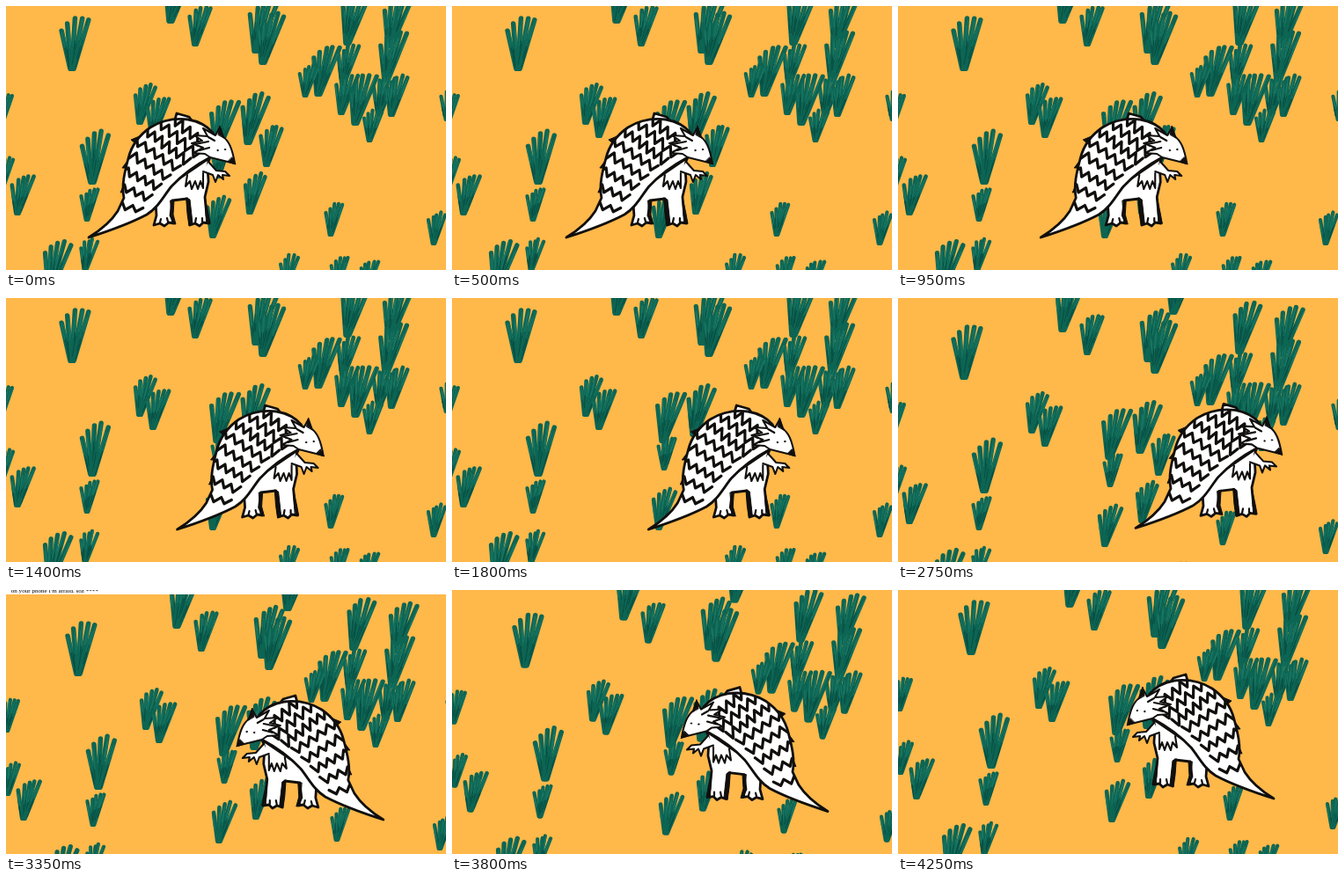
An HTML page for the animation above (4300 ms loop, 500 px wide and 300 px high).

```html
<!DOCTYPE html>
<html lang="en">
<head>
<meta charset="utf-8">
<title>Pangolin walk</title>
<style>
html, body { margin: 0; width: 100%; height: 100%; overflow: hidden; background: #ffb84a; }
svg { display: block; width: 100vw; height: 100vh; }
text { font: 7.1px "Liberation Serif", "Noto Serif", serif; text-anchor: end; }
#beast { stroke: #110f0d; stroke-linejoin: round; stroke-linecap: round; }
#beast .skin { fill: #fff; stroke-width: 2.8; }
#beast .thin { stroke-width: 2.1; }
#beast .line { fill: none; stroke-width: 2.2; }
#beast .ink { fill: #110f0d; stroke-width: 1; }
#scales { fill: none; stroke-width: 3.2; }
</style>
</head>
<body>
<svg viewBox="0 0 500 300" preserveAspectRatio="none">
  <defs>
    <clipPath id="inside"><path id="shell" d="M94 263 C107 255 120 244 127 233 L134 218 C131 204 135 188 139 173 C143 157 151 147 164 138 C177 130 190 127 207 129 C219 131 229 137 235 144 C239 154 239 165 232 172 C215 181 200 192 188 205 C179 216 173 229 160 237 C145 245 119 255 94 263Z"/></clipPath>
  </defs>
  <g id="world">
    <rect x="-20" y="-19" width="540" height="400" fill="#ffb84a"/>
    <g id="grass" stroke-linecap="round"></g>
    <rect x="-20" y="-80" width="540" height="61" fill="#fff"/>
    <text x="98" y="-21">on your phone I'm afraid. soz ****</text>
  </g>
  <g id="beast">
    <!-- belly and legs -->
    <path class="skin" d="M232 172 C227 180 230 190 230 200 L226 217 L228 238 L231 247 L224 246 L220 250 L215 247 L209 249 L208 237 L206 219 L189 221 L187 238 L191 247 L185 246 L180 250 L175 247 L168 249 L171 238 L170 224 L188 202Z"/>
    <path class="ink" d="M205 218 L209 220 L212 247 L208 250 L206 236Z M187 221 L191 221 L190 237 L193 248 L189 247Z M226 217 L230 236 L232 247 L228 247Z"/>
    <path class="line" d="M175 246 L176 242 M184 245 L183 241 M215 246 L216 241 M223 245 L223 241"/>
    <!-- arms -->
    <path class="skin thin" d="M230 177 L239 187 L249 188 L254 193 L246 192 L247 197 L241 192 L238 200 L235 192 L224 188"/>
    <path class="skin thin" d="M206 192 L204 205 L209 199 L211 208 L215 199 L218 208 L221 199 L224 207 L224 190"/>
    <!-- shell -->
    <path class="ink" d="M141 172 L132 184 L138 184Z M137 196 L130 212 L136 211Z M154 147 L142 152 L148 157Z"/>
    <path class="skin" d="M192 129 L194 122 L208 126 L211 130Z"/>
    <use href="#shell" class="skin"/>
    <g clip-path="url(#inside)"><path id="scales"/></g>
    <!-- head -->
    <path class="skin thin" d="M211 156 L223 153 L214 147 L229 148 L224 139 L238 147 L243 138 L246 148 C253 153 257 161 260 179 L248 176 L232 172 L226 168 L213 167 L224 161Z"/>
    <path class="ink" d="M257 172 L261 180 L252 177Z M241 146 L243 136 L248 150Z"/>
    <path class="line" d="M215 157 L230 154 M220 164 L231 161 M230 149 L237 153"/>
    <circle class="ink" cx="240.5" cy="164" r=".7"/>
    <circle class="ink" cx="249" cy="163" r=".7"/>
  </g>
</svg>
<script>
const $ = id => document.getElementById(id);
const LOOP = 4300, STEP = 50, TURN = 3150;

let seed = 11;
const rand = () => (seed = (seed * 16807) % 2147483647) / 2147483647;
const jit = n => (rand() - .5) * n;

// where tufts are rooted, by size
const meadow = [
  { h: 63, lean: .05, roots: "75,74 98,203" },
  { h: 60, lean: .15, roots: "187,20 313,0 284,54 388,45 436,48 292,67 432,87 355,103 397,136 275,158 240,165 50,325" },
  { h: 48, lean: .13, roots: "215,46 383,90 381,124 424,125 438,126 152,135 167,150 296,183 277,237 13,238 235,264" },
  { h: 39, lean: .1, roots: "340,104 501,131 -6,138 413,155 241,196 -5,210 92,245 369,262 486,272 90,302 318,320 376,322 409,326" }
];

function stroke(x1, y1, x2, y2, w, color) {
  return `<path d="M${x1} ${y1}L${x2} ${y2}" stroke="${color}" stroke-width="${w}"/>`;
}

function drawTuft(x, y, h, lean) {
  const w = 2 + h * .055, blades = 5;
  let out = "";
  for (let i = 0; i < blades; i++) {
    const p = i / (blades - 1);
    const rx = x + (p - .5) * h * .07, ry = y - w / 2;
    const dx = h * (lean + (p - .5) * .42) + jit(2);
    const dy = w - h * (.76 + .24 * Math.sin(p * 2.2)) + jit(3);
    out += stroke(rx, ry, rx + dx, ry + dy, w, "#0d6553");
    // crayon streaks along the blade, darker near the root
    for (let k = 0; k < 4; k++) {
      const o = jit(w * .8), a = k < 2 ? rand() * .3 : .4 + rand() * .2, b = a + .4;
      out += stroke(rx + dx * a + o, ry + dy * a, rx + dx * b + o, ry + dy * b, .9, k < 2 ? "#074a40" : "#1b7a66");
    }
  }
  return out;
}

$("grass").innerHTML = meadow
  .flatMap(({ h, lean, roots }) => roots.split(" ").map(r => [...r.split(",").map(Number), h, lean]))
  .sort((a, b) => a[1] - b[1])
  .map(tuft => drawTuft(...tuft)).join("");

const bend = (a, c, b, p) => a.map((v, i) => v * (1 - p) ** 2 + 2 * c[i] * p * (1 - p) + b[i] * p * p);

// jagged rows spanning the shell from the back edge to the belly edge
function zigzag(p) {
  const [x1, y1] = bend([196, 126], [122, 138], [118, 242], p);
  const [x2, y2] = bend([236, 163], [185, 183], [148, 242], p);
  const n = 2 * Math.max(2, Math.round(Math.hypot(x2 - x1, y2 - y1) / 11));
  let d = "";
  for (let i = 0; i <= n; i++) {
    const q = i / n, a = (i % 2 ? 5.5 : -5) * (1 - p * .4) + jit(1.5);
    d += `${i ? "L" : "M"}${x1 + (x2 - x1) * q - a * .45} ${y1 + (y2 - y1) * q + a}`;
  }
  return d;
}
const ROWS = 8;
$("scales").setAttribute("d", Array.from({ length: ROWS }, (_, k) => zigzag((k + .3) / ROWS)).join(""));

const ramp = (t, from, to) => Math.min(1, Math.max(0, (t - from) / (to - from)));
const ease = p => p * p * (3 - 2 * p);
const place = (id, x, y, flip = "") => $(id).setAttribute("transform", `translate(${x} ${y}) ${flip}`);

const start = performance.now();
function frame() {
  const t = Math.floor(((performance.now() - start) % LOOP) / STEP) * STEP;
  const climb = ramp(t, 2450, 2830);
  const scroll = 24 * ease(ramp(t, 3500, 4200));
  const y = -2 * climb - scroll;
  place("world", 8 * ramp(t, TURN, 3380), 24 * climb - scroll);
  if (t < TURN) place("beast", 176 * ramp(t, 0, 2450), y);
  else place("beast", 530 - 9 * ramp(t, TURN, 3400), y, "scale(-1 1)");
  requestAnimationFrame(frame);
}
frame();
</script>
</body>
</html>
```
